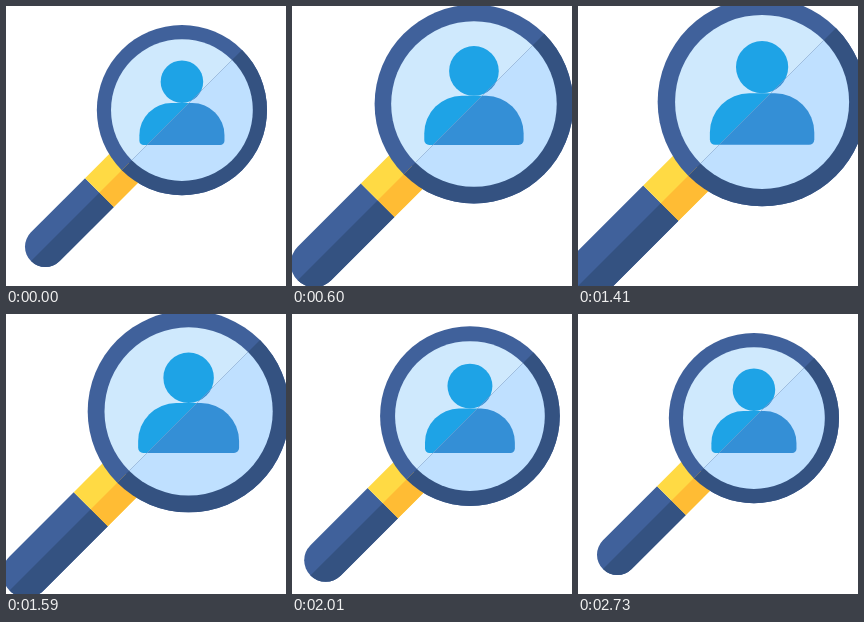
Animation of 280x280 px, one loop 2.76 s. Source, as an HTML page:

```html
<!DOCTYPE html>
<html lang="en">
<head>
<meta charset="utf-8">
<title>Profile search</title>
<style>
  html, body { margin: 0; width: 100%; height: 100%; overflow: hidden; background: #fff; }
  svg { display: block; width: 100%; height: 100%; }
  .light { --frame: #40619b; --band: #ffda44; --glass: #cfe9fd; --person: #1ea3e6; }
  .shade { --frame: #345281; --band: #ffbc34; --glass: #bfe0ff; --person: #348fd6; }
  .frame { fill: var(--frame); }
  .band { fill: var(--band); }
  .glass { fill: var(--glass); }
  .person { fill: var(--person); }
</style>
</head>
<body>
<svg viewBox="0 0 280 280">
  <defs>
    <g id="lens">
      <!-- handle runs along the diagonal from the lower left -->
      <g transform="translate(43 469) rotate(-45)">
        <path class="frame" d="M0 -43H162V43H0A43 43 0 0 1 0 -43Z"/>
        <path class="band" d="M162 -43H250V43H162Z"/>
      </g>
      <circle class="frame" cx="332" cy="180" r="180"/>
      <circle class="glass" cx="332" cy="180" r="150"/>
      <g class="person">
        <circle cx="332" cy="120" r="45"/>
        <path d="M310 165H354A68 68 0 0 1 422 233V245A9 9 0 0 1 413 254H251A9 9 0 0 1 242 245V233A68 68 0 0 1 310 165Z"/>
      </g>
    </g>
    <clipPath id="half"><path d="M532 -20V532H-20Z"/></clipPath>
  </defs>
  <g id="icon">
    <use class="light" href="#lens"/>
    <g clip-path="url(#half)"><use class="shade" href="#lens"/></g>
  </g>
</svg>
<script>
  const LOOP = 2760, STEP = 30, BASE = 242 / 512, GROW = 0.23;
  const icon = document.getElementById('icon');

  const bezier = (a, b, t) => 3 * (1 - t) * (1 - t) * t * a + 3 * (1 - t) * t * t * b + t * t * t;

  // cubic-bezier(.25, .1, .25, 1)
  function ease(x) {
    let lo = 0, hi = 1;
    for (let i = 0; i < 30; i++) {
      const mid = (lo + hi) / 2;
      if (bezier(0.25, 0.25, mid) < x) lo = mid; else hi = mid;
    }
    return bezier(0.1, 1, lo);
  }

  function draw(ms) {
    const t = Math.floor((ms % LOOP) / STEP) * STEP;
    const u = t / (LOOP / 2);
    const swell = u < 1 ? ease(u) : 1 - ease(u - 1);
    const k = BASE * (1 + GROW * swell);
    icon.setAttribute('transform', `translate(140 140) scale(${k}) translate(-256 -256)`);
  }

  const start = performance.now();
  function tick() {
    draw(performance.now() - start);
    requestAnimationFrame(tick);
  }
  tick();
</script>
</body>
</html>
```
